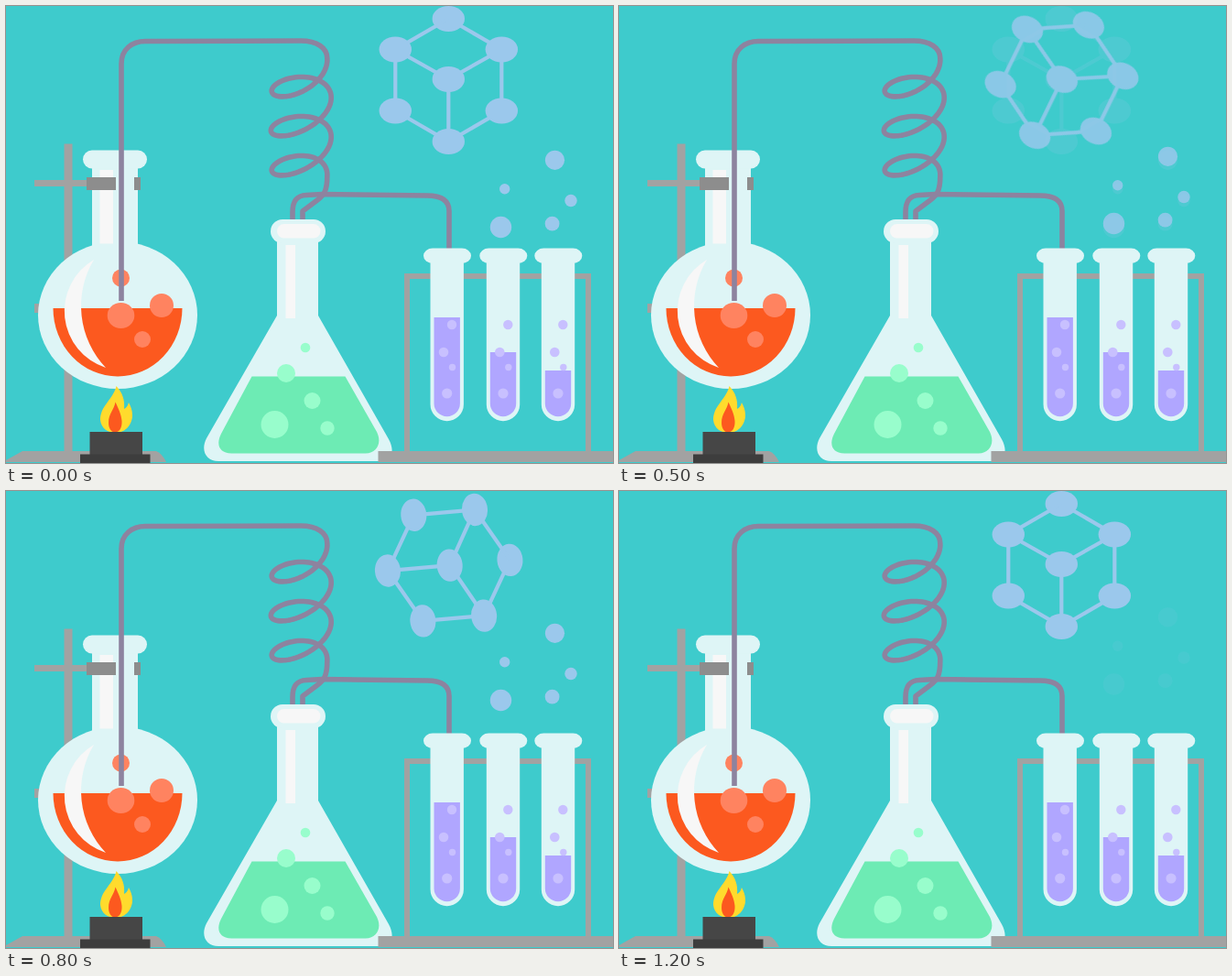
Recreate the animation shown at these times as an HTML page. Size 663 by 499 pixels, loop 1300 ms.

```html
<!DOCTYPE html>
<html lang="en">
<head>
<meta charset="utf-8">
<title>Chemistry set</title>
<style>
html, body { margin: 0; width: 100%; height: 100%; overflow: hidden; background: #3ecbcc; }
svg { display: block; width: 100vw; height: 100vh; }
.grey { fill: #a2a2a2; }
.clamp { fill: #8d8d8d; }
.glass { fill: #def5f6; }
.shine { fill: #f7f7f7; }
.orange { fill: #fc591f; }
.pipe { fill: none; stroke: #8d839f; stroke-width: 5.6; stroke-linejoin: round; }
.violet { fill: #b0a6ff; }
.air { fill: #9bc8ec; }
.bond { fill: none; stroke: #9bc8ec; stroke-width: 4.2; }
</style>
</head>
<body>
<svg viewBox="0 0 663 499">
  <!-- stand -->
  <g class="grey">
    <rect x="63.5" y="150.5" width="9" height="337"/>
    <rect x="31" y="190" width="60" height="7"/>
    <rect x="31" y="325" width="12" height="10"/>
    <path d="M18 486H164Q170 488 175 498H0V496Z"/>
  </g>

  <!-- round flask -->
  <g class="glass">
    <ellipse cx="122" cy="337.5" rx="87" ry="80.5"/>
    <rect x="94" y="170" width="50" height="100"/>
    <rect x="84" y="157.5" width="70" height="20" rx="10"/>
  </g>
  <rect class="shine" x="102.5" y="179" width="14.5" height="80.5"/>
  <path class="orange" d="M51.5 330H192.5A70.5 74.5 0 0 1 51.5 330Z"/>
  <path class="shine" d="M96 277A65 65 0 0 0 109 395A98 98 0 0 1 96 277Z"/>
  <g id="hot" fill="#ff8360"></g>
  <path class="clamp" d="M88 187H120V201H88ZM140 187H147V201H140Z"/>

  <!-- burner -->
  <path fill="#ffdb2d" d="M120.5 415C117 430 103 436 103 452C104 461 111 466 120 466C131 466 138 456 138 447C138 441 136 437 134 433C133 437 131 439 129 440C130 430 127 422 120.5 415Z"/>
  <path class="orange" d="M119.5 432.5C118 441 112 445 112 455C112 461 115 465.5 119 465.5C124 465.5 127 460 126.5 453C126 446 123 440 119.5 432.5Z"/>
  <rect x="91.5" y="465" width="57.5" height="25" fill="#464646"/>
  <rect x="81" y="489.5" width="76.5" height="9.5" fill="#3d3d3d"/>

  <!-- pipes -->
  <path class="pipe" id="coil"/>
  <path class="pipe" d="M313 236V225C313 212 318 207 328 206.5L345 205.5L460 207C476 207 484 213 484 224V266"/>

  <!-- conical flask -->
  <path class="glass" d="M296 250V338L219 472C212 486 219 497 232 497H407C420 497 426 488 418 473L341 338V250Z"/>
  <rect class="glass" x="289" y="233" width="60" height="26" rx="13"/>
  <rect class="shine" x="296" y="238" width="47.5" height="15.5" rx="7.7"/>
  <rect class="shine" x="305.5" y="261" width="10.5" height="80"/>
  <path fill="#6debb4" d="M268.5 404.5H370.5L405 465C411 477 405 488.5 393 488.5H246C233 488.5 229 479 235 467Z"/>
  <g id="green" fill="#98fdcc"></g>

  <!-- rack -->
  <path d="M438 488V295H636V488" fill="none" stroke="#a2a2a2" stroke-width="6"/>
  <rect class="grey" x="406.5" y="486" width="257" height="12"/>
  <g id="tubes"></g>
  <g id="air"></g>
</svg>
<script>
const byId = id => document.getElementById(id);

function add(parent, tag, attrs) {
  const el = document.createElementNS("http://www.w3.org/2000/svg", tag);
  for (const key in attrs) el.setAttribute(key, attrs[key]);
  parent.append(el);
  return el;
}

const dot = (parent, cx, cy, rx, ry = rx) => add(parent, "ellipse", { cx, cy, rx, ry });

const hot = byId("hot");
dot(hot, 125.5, 297, 9.5);
dot(hot, 125.5, 338, 14.8, 14);
dot(hot, 170, 327, 13);
dot(hot, 149, 364, 9);

const green = byId("green");
dot(green, 327, 373, 5.3);
dot(green, 306, 401, 10);
dot(green, 334.5, 431, 9);
dot(green, 293.5, 457, 15);
dot(green, 351, 461, 7.7);

// Three tilted loops, slightly narrower at both ends
function coilPoint(turn) {
  const a = turn * 2 * Math.PI;
  const taper = 4.5 * ((turn - 0.5) / 1.5) ** 4;
  const x = 322.3 + (33 - taper) * Math.cos(a);
  const y = 100 + 43 * turn + 19 * Math.sin(a) + 7.2 * (1 - Math.cos(a));
  return `L${x.toFixed(2)} ${y.toFixed(2)}`;
}
let coil = "M126 322V63C126 47 138 38.5 152 38.5L322 38C340 38 350.8 46 350.8 57";
for (let i = -72; i <= 144; i++) coil += coilPoint(i / 72);
byId("coil").setAttribute("d", coil + "C350.8 202 347 207 340 212L324 224V236");

function testTube(x, level) {
  const g = add(byId("tubes"), "g", { transform: `translate(${x} 0)` });
  add(g, "path", { class: "glass", d: "M463.5 272V435a18.2 18.2 0 0 0 36.4 0V272Z" });
  add(g, "rect", { class: "glass", x: 456, y: 264.5, width: 52, height: 16.5, rx: 10, ry: 8.2 });
  add(g, "path", { class: "violet", d: `M467.5 ${level}V434a14.2 14.2 0 0 0 28.4 0V${level}Z` });
  const fizz = add(g, "g", { fill: "#c8c0ff" });
  dot(fizz, 487, 348, 5.2);
  dot(fizz, 478, 378, 5.3);
  dot(fizz, 487.5, 394.5, 3.7);
  dot(fizz, 481.7, 423, 5.6);
}
testTube(0, 340);
testTube(61.3, 378);
testTube(121.3, 398);

// One drawing of the molecule with its rising bubbles
function airLayer() {
  const root = add(byId("air"), "g", {});
  const molecule = add(root, "g", {});
  const cx = 483.3, cy = 81, r = 67;
  for (let i = 0; i < 6; i++) {
    const corner = n => {
      const a = (n * 60 - 90) * Math.PI / 180;
      return `${cx + r * Math.cos(a)} ${cy + r * Math.sin(a)}`;
    };
    const spoke = i % 2 ? `L${cx} ${cy - 1}` : "";
    add(molecule, "path", { class: "bond", d: `M${corner(i + 1)}L${corner(i)}${spoke}` });
    const [x, y] = corner(i).split(" ");
    add(molecule, "ellipse", { class: "air", cx: x, cy: y, rx: 17.7, ry: 14 });
  }
  add(molecule, "ellipse", { class: "air", cx, cy: cy - 1, rx: 17.7, ry: 14 });

  const bubbles = add(root, "g", { class: "air" });
  dot(bubbles, 599.5, 168.3, 10.6);
  dot(bubbles, 544.7, 199.7, 5.7);
  dot(bubbles, 617, 212.5, 6.7);
  dot(bubbles, 540.5, 241.5, 11.7);
  dot(bubbles, 596.6, 237.7, 7.9);

  return (opacity, angle, rise, fade = 1) => {
    root.setAttribute("opacity", opacity);
    molecule.setAttribute("transform", `rotate(${angle} 483.4 81.3)`);
    bubbles.setAttribute("transform", `translate(0 ${-rise})`);
    bubbles.setAttribute("opacity", fade);
  };
}
const first = airLayer(), second = airLayer();

const STEP = 100, LOOP = 1300, BLEND = 6;
const RISE = [4, 13, 16, 30.5], FADE = [1, 1, 0.5, 0.1];

// Straight line between evenly spaced key values
function between(keys, pos) {
  const i = Math.min(Math.floor(pos), keys.length - 2);
  return keys[i] + (keys[i + 1] - keys[i]) * (pos - i);
}

function draw(time) {
  const step = Math.floor((time % LOOP) / STEP);
  const mix = Math.min(step / BLEND, 1);
  const after = Math.max(step - BLEND, 0);
  const angle = after < 4 ? 26 + 29.5 * after : 0;
  first(1 - mix, 0, 0);
  second(mix, angle, between(RISE, after / 2), between(FADE, after / 2));
}

const start = performance.now();
function tick() {
  draw(performance.now() - start);
  requestAnimationFrame(tick);
}
tick();
</script>
</body>
</html>
```
